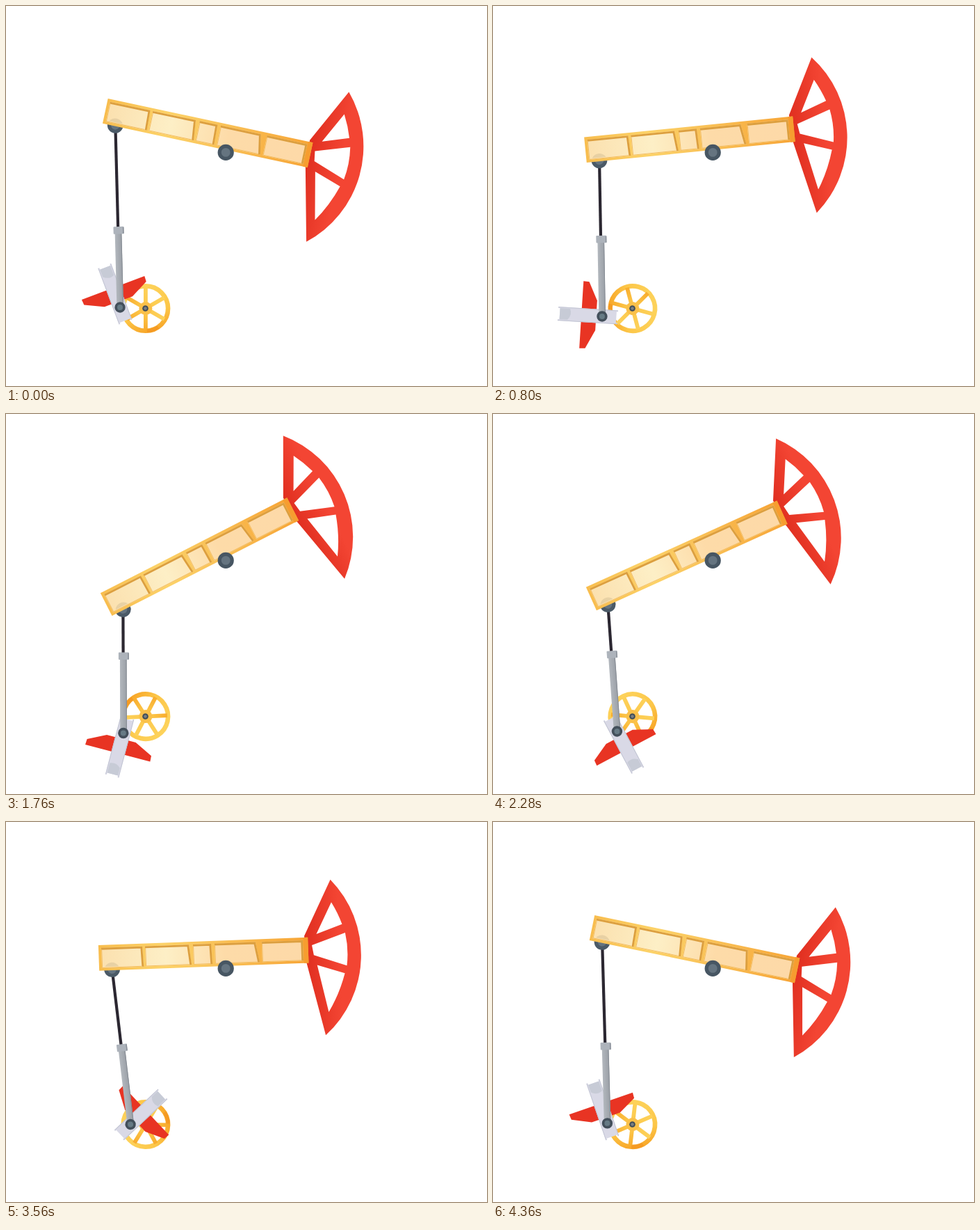
An HTML page for the animation above (4.4 s loop, 692 px wide and 546 px high).

```html
<!DOCTYPE html>
<html lang="en">
<head>
<meta charset="utf-8">
<title>Pump jack</title>
<style>
html, body { margin: 0; width: 100%; height: 100%; overflow: hidden; background: #fff; }
svg { display: block; width: 692px; height: 546px; }
</style>
</head>
<body>
<svg viewBox="0 0 692 546">
  <defs>
    <linearGradient id="gold" gradientUnits="userSpaceOnUse" x1="-182" y1="0" x2="120" y2="0">
      <stop offset="0" stop-color="#f8bd4e"/>
      <stop offset=".3" stop-color="#fcd268"/>
      <stop offset=".6" stop-color="#f9c056"/>
      <stop offset="1" stop-color="#f7a435"/>
    </linearGradient>
    <linearGradient id="cream" gradientUnits="userSpaceOnUse" x1="-182" y1="0" x2="120" y2="0">
      <stop offset="0" stop-color="#fbe0ae"/>
      <stop offset=".32" stop-color="#fdefc6"/>
      <stop offset=".6" stop-color="#fddba8"/>
      <stop offset="1" stop-color="#fdd9a8"/>
    </linearGradient>
    <linearGradient id="fan" gradientUnits="userSpaceOnUse" x1="115" y1="-20" x2="165" y2="-20">
      <stop offset="0" stop-color="#e02f20"/>
      <stop offset="1" stop-color="#f34533"/>
    </linearGradient>
    <linearGradient id="ring" gradientUnits="userSpaceOnUse" x1="-10" y1="-35" x2="12" y2="35">
      <stop offset="0" stop-color="#fdd35c"/>
      <stop offset=".6" stop-color="#fcc648"/>
      <stop offset="1" stop-color="#f7a325"/>
    </linearGradient>
    <linearGradient id="steel" gradientUnits="userSpaceOnUse" x1="-5" y1="0" x2="5" y2="0">
      <stop offset="0" stop-color="#b3b8be"/>
      <stop offset="1" stop-color="#9ba0a7"/>
    </linearGradient>
  </defs>

  <g id="wheel" fill="none" stroke="url(#ring)"></g>
  <circle cx="200.5" cy="434.5" r="4.3" fill="#3f4c58"/>
  <circle cx="200.5" cy="434.5" r="2.3" fill="#7b7f82"/>

  <g id="crank">
    <path d="M43.3-49.5L43.3 47L35 46.5L22 20.5L22-22.5L35-49Z" fill="#e83423"/>
    <path d="M-9-11.8H77V-9.8H74.5V6.2H77V8.2H-9V6.2H-7V-9.8H-9Z" fill="#d9d9e6"/>
    <path d="M63-9.8H74.5V6.2H60Q56-2 63-9.8Z" fill="#c7cbd6"/>
    <path d="M-9-11.3H77M-9 7.7H77" stroke="#c2c5d3"/>
  </g>

  <g id="rod">
    <rect id="stem" x="-2" width="4.2" fill="#2b2731"/>
    <rect x="-4.6" y="-110" width="9.6" height="112" fill="url(#steel)"/>
    <path d="M4.6-106V0" stroke="#858b93"/>
    <rect x="-6.6" y="-116" width="15" height="10.5" rx="1" fill="#adb3bb"/>
    <path d="M7.6-115V-106" stroke="#8a9099" stroke-width="1.5"/>
    <circle r="7.7" fill="#434f5b"/>
    <circle r="4" fill="#667a85"/>
  </g>

  <g id="beam">
    <circle cx="-163.6" cy="-4.8" r="11.4" fill="#4b5a67"/>
    <circle cx="-163.6" cy="-4.8" r="6.2" fill="#657480"/>
    <path fill="url(#fan)" fill-rule="evenodd" d="M114.5-42.5L155-122A155.4 155.4 0 0 1 140.2 101.2L116.4-4Z
      M155.2-89.5Q164-74 169.5-57.5L132-44.4Z
      M173.5-45Q178-21 174.3 2.4L127.3-14.3L125-28.7Z
      M131.6 0L171 13.2Q162 43 145.8 68Z"/>
    <rect x="-182" y="-40.2" width="301.5" height="36.7" fill="url(#gold)"/>
    <rect x="113" y="-40.2" width="6.5" height="36.7" fill="#f69d30"/>
    <g id="panels" transform="translate(0 -.6)"></g>
    <path d="M-173.5-9A11.5 11.5 0 0 1-153.7-9Z" fill="#8f7f63" opacity=".18"/>
  </g>
  <circle cx="316.2" cy="210.4" r="11.6" fill="#475663"/>
  <circle cx="316.2" cy="210.4" r="6.4" fill="#657480"/>
</svg>
<script>
const LOOP = 4400, STEP = 40;
const PEAK = 1920, REST = 4380;          // beam turns around, beam and crank are back
const LOW = 12.1, HIGH = -30.6;
const WHEEL_DELAY = 30, WHEEL_TIME = 4350;
const RAD = Math.PI / 180;
const $ = id => document.getElementById(id);

// Wheel: rim, spokes, hub and a darker patch
const spokes = [0, 60, 120].map(a => `<path d="M0-31V31" stroke-width="5.8" transform="rotate(${a})"/>`);
$('wheel').innerHTML = '<circle r="32.2" stroke-width="6.6"/>' + spokes.join('') +
  '<circle r="9.5" fill="#fac049" stroke="none"/>' +
  '<path d="M2 32.1A32.2 32.2 0 0 0 18 26.7" stroke="#f28c1b" stroke-width="5" opacity=".5"/>';

// Panels: left, right at the top, right at the bottom
const panels = [[-178, -119, -118], [-115, -52, -49], [-46, -20, -19], [-15, 44, 49], [53, 112, 112]];
$('panels').innerHTML = panels.map(([l, t, b]) =>
  `<path d="M${l}-35.5H${t}L${b}-6.5H${l}Z" fill="url(#cream)"/>` +
  `<path d="M${l}-34.2H${t - 1.2}L${b - 1.2}-6.5" fill="none" stroke="#dc9f3f" stroke-width="2.8"/>` +
  `<path d="M${l + .6}-33V-7H${b - 3}" fill="none" stroke="#f3bd62" stroke-width="1"/>`).join('');

const place = (id, x, y, a) => $(id).setAttribute('transform', `translate(${x} ${y}) rotate(${a})`);

function draw(t) {
  const turn = -360 * Math.min(t / REST, 1);
  const spin = -1440 * Math.max(0, t - WHEEL_DELAY) / WHEEL_TIME;
  const swing = t < PEAK ? t / PEAK : (REST - t) / (REST - PEAK);
  const tilt = LOW + (HIGH - LOW) * swing;

  const p = (241.7 + turn) * RAD;
  const px = 170.5 + 13.6 * Math.cos(p), py = 445 + 13.6 * Math.sin(p);
  const c = Math.cos(tilt * RAD), s = Math.sin(tilt * RAD);
  const dx = 316.2 - 163.6 * c + 4.8 * s - px;
  const dy = 210.4 - 163.6 * s - 4.8 * c - py;
  const len = Math.hypot(dx, dy);

  place('wheel', 200.9, 434.6, spin);
  place('crank', 170.5, 445, 249.4 + turn);
  place('rod', px, py, Math.atan2(dx, -dy) / RAD);
  $('stem').setAttribute('y', -len);
  $('stem').setAttribute('height', len - 105);
  place('beam', 316.2, 210.4, tilt);
}

const start = performance.now();
function tick() {
  const t = (performance.now() - start) % LOOP;
  draw(Math.floor(t / STEP) * STEP);
  requestAnimationFrame(tick);
}
tick();
</script>
</body>
</html>
```
